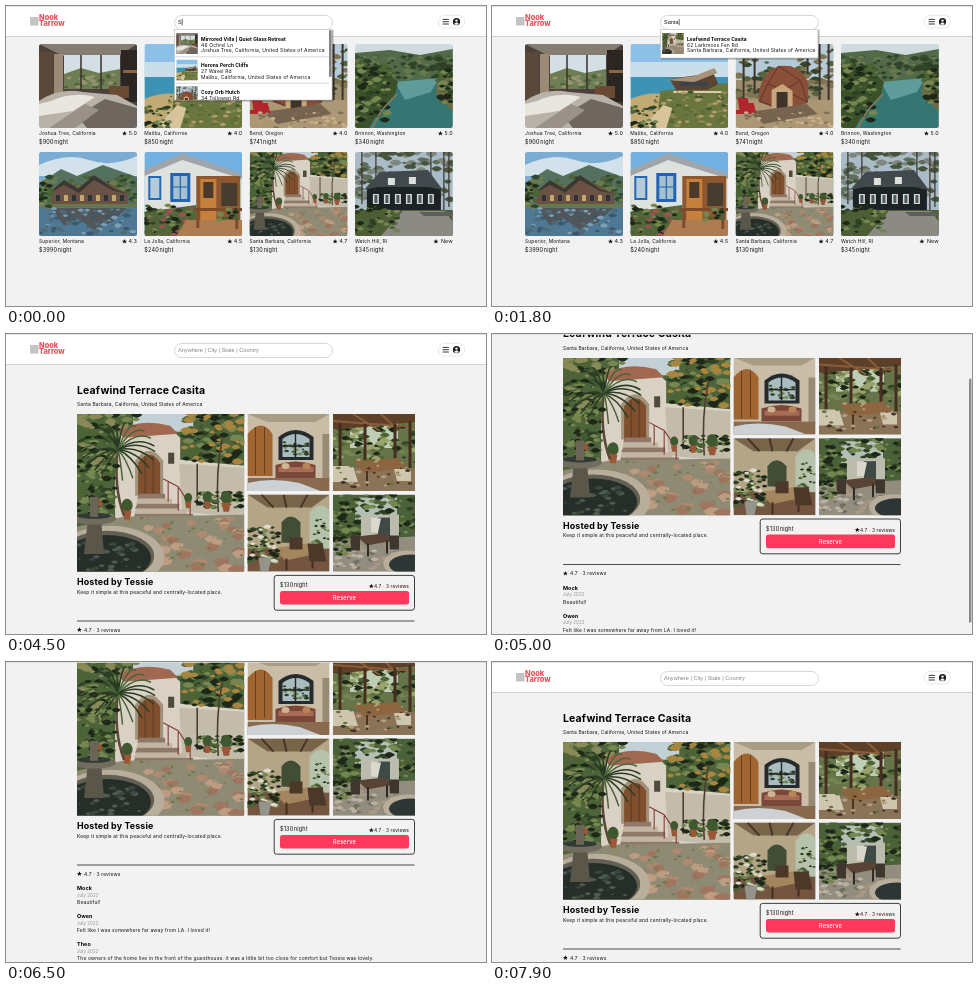
Animation of 480x300 px, one loop 8 s. Source, as an HTML page:

```html
<!DOCTYPE html>
<html lang="en">
<head>
<meta charset="utf-8">
<title>Stay search</title>
<style>
html, body { margin: 0; width: 100%; height: 100%; overflow: hidden; background: #f2f2f2; }
svg#stage { display: block; width: 100vw; height: 100vh; }
text { font-family: Inter, "Open Sans", sans-serif; font-weight: 400; letter-spacing: .03em; fill: #111; white-space: pre; }
.b { font-weight: 700; letter-spacing: .015em; fill: #000; }
.logo { font-weight: 800; letter-spacing: 0; fill: #e2555c; }
.field { font-family: "Liberation Sans", Arial, sans-serif; letter-spacing: 0; }
.hint { fill: #858585; }
.date { fill: #8c8c8c; }
.on { font-weight: 500; fill: #fff; }

#page, #thumb, #bar, .step { animation: 8s infinite; }
.step { animation-timing-function: step-end; }
#list { animation-name: list; }
#loading { animation-name: loading; }
#detail { animation-name: detail; }
#hint { animation-name: hint; }
#all { animation-name: all; }
#match { animation-name: match; }
#cover { animation-name: type; }
#caret { animation-name: blink; }
#page { animation-name: scroll; }
#thumb { animation-name: thumb; }
#bar { animation-name: bar; }

@keyframes list { 0% { visibility: visible } 38.75%, 100% { visibility: hidden } }
@keyframes hint { 0% { visibility: hidden } 38.75%, 100% { visibility: visible } }
@keyframes loading { 0% { visibility: hidden } 38.75% { visibility: visible } 47.5%, 100% { visibility: hidden } }
@keyframes detail { 0% { visibility: hidden } 47.5%, 100% { visibility: visible } }
@keyframes all { 0% { opacity: 1 } 6.25%, 100% { opacity: 0 } }
@keyframes match { 0% { opacity: 0 } 6.25%, 100% { opacity: 1 } }
@keyframes type {
  0% { transform: translateX(3.8px) }
  6.25% { transform: translateX(6.9px) }
  10% { transform: translateX(10px) }
  13.75% { transform: translateX(11.6px) }
  17.5%, 100% { transform: translateX(14.7px) }
}
@keyframes blink { 0%, 30% { opacity: 1 } 23.75%, 36.25%, 100% { opacity: 0 } }
@keyframes scroll {
  0%, 58.75% { transform: none; animation-timing-function: ease-in-out }
  65%, 87% { transform: translateY(-84px); animation-timing-function: ease-in }
  88.75% { transform: translateY(-49.5px); animation-timing-function: linear }
  90% { transform: translateY(-16px); animation-timing-function: ease-out }
  92.5%, 100% { transform: none }
}
@keyframes thumb {
  0%, 58.75% { transform: none; animation-timing-function: ease-in-out }
  65%, 87% { transform: translateY(65.6px); animation-timing-function: ease-in }
  88.75% { transform: translateY(38.7px); animation-timing-function: linear }
  90% { transform: translateY(12.5px); animation-timing-function: ease-out }
  92.5%, 100% { transform: none }
}
@keyframes bar {
  0%, 58.7% { opacity: 0 } 58.8%, 72% { opacity: 1 } 75%, 86.9% { opacity: 0 }
  87%, 95% { opacity: 1 } 97.5%, 100% { opacity: 0 }
}
</style>
</head>
<body>
<svg id="stage" viewBox="0 0 480 300"></svg>
<script>
const rect = (x, y, w, h, fill, more = '') =>
  `<rect x="${x}" y="${y}" width="${w}" height="${h}" fill="${fill}" ${more}/>`;
const path = (d, fill, more = '') => `<path d="${d}" fill="${fill}" ${more}/>`;
const line = (d, stroke, w = 1) => path(d, 'none', `stroke="${stroke}" stroke-width="${w}"`);
const oval = (x, y, rx, ry, fill) => `<ellipse cx="${x}" cy="${y}" rx="${rx}" ry="${ry}" fill="${fill}"/>`;
const text = (x, y, size, str, cls = '', more = '') =>
  `<text x="${x}" y="${y}" font-size="${size}" class="${cls}" ${more}>${str}</text>`;
const star = (x, y) => path(
  'M0-2.7.8-.8 2.7-.75 1.2.5 1.7 2.3 0 1.2-1.7 2.3-1.2.5-2.7-.75-.8-.8Z', '#111', `transform="translate(${x} ${y}) scale(.9)"`);
const photo = (id, x, y, w, h) => `<use href="#${id}" x="${x}" y="${y}" width="${w}" height="${h}"/>`;
const range = n => [...Array(n).keys()];

// Seeded flecks for leaves, stones and ripples; one path per colour
let seed = 7;
const rnd = () => (seed = seed * 16807 % 2147483647) / 2147483647;
const fleck = (x, y, s) => `M${(x - s).toFixed(1)} ${y.toFixed(1)}q${s} ${-s} ${2 * s} 0q${-s} ${s} ${-2 * s} 0`;
const spray = (n, x, y, w, h, r, colours) => colours.map(c =>
  path(range(Math.ceil(n * 2 / colours.length)).map(() =>
    fleck(x + rnd() * w, y + rnd() * h, +(r * (.4 + rnd() * .7)).toFixed(1))).join(''), c)).join('');
const greens = ['#2f4125', '#4c6334', '#758650', '#1d2819'];

const frond = a => {
  const x = Math.cos(a), y = Math.sin(a);
  return line(`M41 36Q${41 + 20 * x} ${26 + 20 * y} ${41 + 37 * x} ${38 + 29 * y}`, a % 2 > 1 ? '#4a6339' : '#2a3d24', 1.5);
};
const pot = (x, y, s) => oval(x, y - 5 * s, 5 * s, 6 * s, '#3f5830') +
  path(`M${x - 4 * s} ${y}h${8 * s}l${-1.5 * s} ${8 * s}h${-5 * s}Z`, '#9a5637');

const photos = {
  bedroom: [98, 84,
    rect(0, 0, 98, 84, '#4b423b') + path('M0 0H98L80 12H24Z', '#857c72') + rect(25, 11, 56, 34, '#d3dfe4') +
    path('M25 30 42 24 60 29 81 25V45H25Z', '#6f7d54') + spray(12, 27, 30, 52, 14, 4, ['#4d613d', '#93946b']) +
    line('M42 11V46M62 11V46', '#38302a', 1.5) + rect(0, 8, 14, 50, '#5a493b') + rect(15, 10, 9, 42, '#9b8a76') +
    rect(82, 6, 16, 52, '#2c2622') + rect(84, 26, 14, 3, '#8a6443') + rect(70, 42, 20, 12, '#6a4a33') +
    path('M0 57Q20 43 44 48L78 51 98 62V84H0Z', '#b9b2a9') + path('M12 57Q34 47 56 53L34 67 0 72V60Z', '#e9e6e0') +
    path('M38 72 66 55 98 64V84H48Z', '#6f675f') + path('M10 84 46 60 60 66 36 84Z', '#9a9188')],
  beach: [98, 84,
    rect(0, 0, 98, 36, '#8cc0e6') + rect(0, 18, 98, 16, '#c8dfea') + rect(0, 33, 98, 22, '#3e92b4') +
    path('M0 55Q24 46 36 52L44 84H0Z', '#c2aa75') + path('M30 47 98 39V84H26Z', '#6a7640') +
    path('M39 35 83 29 88 40 77 46H46Z', '#5c4433') + path('M35 36 64 32 84 24 87 29 64 38Z', '#a8927a') +
    rect(50, 38, 28, 4, '#37444a') + line('M43 48H91', '#dccbaa', 2) + spray(46, 24, 48, 74, 34, 3.5, ['#42582c', '#8a8752', '#5e6e36', '#b39c67']) +
    path('M12 84 33 61 42 64 36 84Z', '#d7c49d') + spray(16, 0, 62, 26, 22, 4, greens)],
  dome: [98, 84,
    rect(0, 0, 98, 84, '#9c8c70') + rect(0, 0, 98, 36, '#b5cad6') + spray(52, 0, 4, 98, 50, 6, ['#35442d', '#57623e', '#7d7452']) +
    line('M8 0V54M19 0V50M84 0V58M93 0V60M72 0V30', '#3f342b', 2) + rect(0, 56, 98, 28, '#ac9775') +
    path('M23 58Q22 31 43 22 66 20 73 40L72 59 48 67Z', '#8a4f38') +
    line('M43 22 32 40 48 46 65 37 43 22M32 40 24 57 48 66 48 46 72 58 65 37', '#57301f', .8) +
    path('M36 64V46L47 40 57 47V65Z', '#c9a57a') + rect(41, 48, 11, 16, '#3f332a') +
    path('M13 68 71 60 82 70 28 80Z', '#756350') + path('M2 54h10l3 13H4ZM0 66h16v4H0ZM9 59h9l3 11H12Z', '#b0252e') +
    spray(24, 10, 68, 88, 16, 3, ['#7f6f59', '#c7b08a'])],
  river: [98, 84,
    rect(0, 0, 98, 84, '#357672') + rect(0, 0, 98, 14, '#d0dbe0') + path('M0 9 35 6 65 11 98 5V34L60 36 0 44Z', '#52694a') +
    spray(50, 0, 12, 98, 22, 5, ['#3b5333', '#66784c', '#2e4429']) + path('M40 38 84 34 76 48 50 56Z', '#5f9c99') +
    path('M0 20 30 26 43 38 40 52 25 65 14 84H0Z', '#3a5129') + spray(50, 0, 20, 34, 58, 5, greens) +
    path('M98 30 84 36 80 48 98 68Z', '#6d6a45') + spray(22, 84, 20, 14, 40, 5, greens) + line('M42 50 27 66 17 84', '#857a5f', 1.8)],
  lodge: [98, 84,
    rect(0, 0, 98, 84, '#7badd4') + path('M0 13Q28 0 50 8T98 4V24H0Z', '#d3e1ea') + path('M0 32 22 17 38 24 64 13 98 25V52H0Z', '#54705f') +
    spray(42, 0, 24, 98, 26, 5, ['#2f4831', '#4d6339', '#6b7c4b']) + path('M12 40 25 29 40 35 55 24 73 33 89 42V54H12Z', '#695243') +
    path('M10 41 25 28 39 37 55 23 75 37 90 42 75 39 55 28 40 41 25 33Z', '#3b3733') + range(9).map(i => rect(17 + i * 8, 43, 4, 6, i % 2 ? '#c4a773' : '#2a3338')).join('') +
    rect(0, 53, 98, 31, '#4f7894') + path('M13 56H88L73 70 55 78 38 66 25 74Z', '#50565a') + spray(32, 0, 56, 98, 27, 4, ['#3a5868', '#7d9fb3', '#4e6a76']) +
    rect(0, 52, 98, 3, '#6c7748') + spray(14, 0, 30, 12, 27, 4, greens)],
  cottage: [98, 84,
    rect(0, 0, 98, 84, '#72b0e2') + path('M0 20 38 4 98 24V70H0Z', '#dfe1df') + path('M0 18 38 1 98 22V27L38 8 0 24Z', '#9fa5a8') +
    rect(4, 24, 13, 24, '#2468b8') + rect(6, 26, 9, 20, '#b6cbd9') + rect(26, 21, 20, 29, '#2263b4') + rect(29, 24, 14, 23, '#a5c0d0') + line('M36 24V47M29 35H43', '#2263b4', 1.2) +
    rect(52, 24, 44, 46, '#8d5830') + rect(56, 27, 16, 42, '#c5803c') + rect(59, 30, 10, 16, '#4a392c') + rect(77, 31, 16, 23, '#473c30') +
    path('M0 60 52 53V84H0Z', '#55663a') + spray(34, 0, 53, 47, 31, 4, [...greens, '#9e5150']) + path('M42 68H98V84H32Z', '#ad7d52') +
    path('M50 56H98V59H50ZM52 58h3v18h-3ZM91 58h3v19h-3Z', '#7d4a2c') + spray(9, 73, 57, 20, 11, 4, greens)],
  garden: [167, 158,
    rect(0, 0, 167, 158, '#4d6339') + rect(56, 0, 60, 18, '#c3d0d6') + spray(75, 0, 0, 60, 66, 6, [...greens, '#8a8a58']) +
    path('M44 18 91 13 103 24V46L167 52V111H38V60Z', '#d9d2c4') + path('M42 17Q63 4 93 12L101 20 46 24Z', '#a06850') +
    path('M102 50 167 54V104L105 98Z', '#c4bcab') + path('M58 82V47Q72 27 86 47V82Z', '#a3927b') + path('M61 82V49Q72 33 83 49V82Z', '#80502e') +
    line('M68 42V81M76 42V81', '#523420', .8) + rect(91, 39, 6, 11, '#4e483d') +
    range(5).map(i => path(`M${62 - i} ${80 + i * 5}H${88 + i * 7}v5H${60 - i}Z`, i % 2 ? '#c2b5a2' : '#8f7869')).join('') +
    line('M86 65 101 73 113 91V104M91 68V88M101 74V97', '#853a38', 1.1) +
    path('M46 103 167 101V158H0V113Z', '#8e8a74') + range(42).map(i => {
      const y = 105 + i * 1.22, x = 50 + rnd() * 117, s = 5 + i / 9;
      return path(`M${x - s} ${y}l${s * .7}-${s * .45} ${s * 1.2} ${s * .2} ${-s * .3} ${s * .7} ${-s} ${s * .2}Z`, ['#b08a70', '#bd9c82', '#a07560'][i % 3]);
    }).join('') + spray(30, 45, 104, 122, 52, 2.5, ['#6c7a4b', '#878b62']) +
    spray(70, 106, 0, 61, 48, 6, [...greens, '#a8853f']) + line('M141 98Q138 60 145 25M120 92V50', '#4d3d2f', 1.6) + spray(22, 118, 78, 49, 16, 4, greens) +
    pot(111, 88, .8) + pot(130, 88, .9) + pot(149, 89, 1.1) + pot(50, 97, 1.1) + pot(22, 85, 1) +
    line('M47 102Q36 73 41 34', '#5d4935', 2.6) + range(22).map(i => frond(i * .29)).join('') +
    spray(42, 0, 52, 40, 52, 5, greens) + oval(33, 143, 54, 31, '#b9ae9b') + oval(30, 142, 47, 25, '#625f53') + oval(30, 144, 44, 23, '#262e2a') +
    spray(18, 0, 128, 62, 28, 4, ['#4d5a50', '#39473d']) + path('M11 105h13l3 35H7Z', '#5b564a') + oval(17, 105, 22, 6, '#726c5f') + oval(17, 102, 17, 3, '#313b35') + rect(13, 83, 8, 20, '#6b6558')],
  barn: [98, 84,
    rect(0, 0, 98, 84, '#a9bbc6') + spray(60, 0, 0, 98, 48, 6, ['#5f6d5b', '#7d8780', '#46543c']) + line('M7 0V52M21 0V45M76 0V40M89 0V60M94 0V55', '#413b34', 1.3) +
    path('M12 37 25 22 72 20 86 38V61H12Z', '#1d2224') + path('M9 38 25 20 73 18 88 38 74 35H23Z', '#41494d') +
    range(6).map(i => rect(18 + i * 11, 42, 6, 10, '#d5d9d4') + rect(19.5 + i * 11, 43, 3, 8, '#4b5a61')).join('') + rect(33, 26, 7, 7, '#dce0da') + rect(54, 25, 7, 7, '#dce0da') +
    path('M0 58H98V84H0Z', '#4d5d35') + path('M48 59H90L98 70V84H26Z', '#8b8a85') + spray(24, 0, 54, 42, 26, 4, greens) + path('M64 60H98V64H69Z', '#5c5f55')],
  window: [82, 77,
    rect(0, 0, 82, 77, '#c9bda7') + path('M0 0H82L68 8H20Z', '#a99b84') + path('M0 60V20Q14 3 25 20V62H0Z', '#a06530') + line('M8 13V61M17 13V60', '#6a3d1b', 1) +
    path('M31 46V23Q48 9 66 23V46Z', '#252b2d') + path('M35 43V25Q48 15 62 25V43Z', '#a9bcc0') + spray(12, 37, 28, 23, 13, 3, greens) + line('M48 18V43M35 32H62', '#22282a', 1.4) +
    path('M28 51Q48 44 68 51V64H28Z', '#7a4738') + rect(31, 53, 35, 5, '#a76c55') + oval(38, 52, 4, 3, '#d0b592') + oval(59, 52, 4, 3, '#b98558') +
    rect(75, 20, 7, 47, '#998a74') + rect(0, 64, 82, 13, '#8a6a4e') + path('M0 69Q24 63 52 69L73 77H0Z', '#cdd1d4')],
  patio: [82, 77,
    rect(0, 0, 82, 77, '#67744a') + rect(17, 4, 48, 30, '#c0cdb5') + spray(52, 0, 10, 82, 35, 5, [...greens, '#9aa36b']) +
    path('M0 0H82V8L10 15H0Z', '#5e3f28') + line('M0 7 82 13M20 0 47 17M48 0 65 16', '#8a5d38', 2) + line('M7 9V73M32 10V49M62 10V51M77 7V67', '#452e1f', 3) +
    rect(0, 54, 82, 23, '#8b7358') + path('M20 47 64 44 75 54 32 59Z', '#8d653f') + line('M34 57V72M68 54V67', '#4d331f', 2) +
    path('M0 52h20l5 16H0ZM61 55h17v12H64Z', '#cfc6b0') + spray(20, 0, 45, 82, 28, 3, ['#43352a', '#66713f', '#b39e7d'])],
  lounge: [82, 77,
    rect(0, 0, 82, 77, '#b5a587') + path('M0 0H82L64 13H20Z', '#786449') + line('M14 0 26 13M36 0 39 13M60 0 53 13', '#443524', 2) +
    path('M34 48V28Q43 16 53 28V49Z', '#424d36') + path('M62 54V18Q73 5 82 16V56Z', '#b5c3ac') + spray(10, 65, 24, 16, 26, 3, greens) +
    rect(0, 54, 82, 23, '#735540') + path('M25 54 59 49 71 59 38 66Z', '#a3855e') + line('M39 64V76M65 59V74', '#452d1d', 2) +
    path('M42 43h13v12H42ZM60 49h15l4 18H62Z', '#4c3829') + spray(42, 0, 30, 32, 38, 4, [...greens, '#dcd8ca']) + path('M11 63h13l-3 14h-8Z', '#94958a')],
  terrace: [82, 77,
    rect(0, 0, 82, 77, '#4b613a') + rect(22, 3, 42, 22, '#b2bfb4') + spray(62, 0, 0, 82, 43, 5, greens) + rect(28, 20, 38, 22, '#bcbcae') + rect(45, 23, 12, 19, '#3e4a45') +
    path('M0 46 82 42V77H0Z', '#938d80') + spray(24, 0, 50, 67, 25, 4, ['#aa9887', '#6f7064', '#b9b2a1']) + path('M24 42 51 39 61 46 34 51Z', '#594334') +
    line('M35 49V62M54 46V59', '#322b24', 2) + path('M17 41h10v15H18ZM56 41h10v14H57Z', '#3f372e') + path('M38 38V23l10 1-3 14Z', '#dad8cd') +
    spray(18, 0, 35, 17, 25, 4, greens) + oval(75, 69, 25, 13, '#b8ad9b') + oval(78, 70, 22, 10, '#2d3634')]
};
const symbols = Object.entries(photos).map(([id, [w, h, art]]) =>
  `<symbol id="${id}" viewBox="0 0 ${w} ${h}" preserveAspectRatio="xMidYMid slice">${art}</symbol>`).join('');

const stays = [
  ['bedroom', 'Joshua Tree, California', 900, '5.0'],
  ['beach', 'Malibu, California', 850, '4.0'],
  ['dome', 'Bend, Oregon', 741, '4.0'],
  ['river', 'Brinnon, Washington', 340, '5.0'],
  ['lodge', 'Superior, Montana', 3990, '4.3'],
  ['cottage', 'La Jolla, California', 240, '4.5'],
  ['garden', 'Santa Barbara, California', 130, '4.7'],
  ['barn', 'Watch Hill, RI', 345, 'New']
];
const spot = i => [33 + i % 4 * 105.3, i < 4 ? 38 : 146];
const corners = stays.map((s, i) => rect(...spot(i), 98, 84, '#000', 'rx="2.5"')).join('');
const pictures = stays.map(([id], i) => photo(id, ...spot(i), 98, 84)).join('');
const labels = stays.map(([, place, price, rate], i) => {
  const [x, y] = spot(i);
  return text(x, y + 90.6, 4.9, place) + star(x + (rate === 'New' ? 81 : 85.5), y + 89.5) +
    text(x + 98, y + 91.4, 5.4, rate, '', 'text-anchor="end"') +
    text(x, y + 99.8, 5.5, `$${price}<tspan dx=".8">night</tspan>`);
}).join('');

const title = 'Leafwind Terrace Casita';
const country = ', California, United States of America';
const hit = (y, id, name, street, city) => photo(id, 170.5, y, 21, 21) + text(195, y + 7.7, 4.9, name, 'b') +
  text(195, y + 13.6, 5, street) + text(195, y + 19.4, 5, city + country);
const panel = h => rect(168.5, 23.5, 157.5, h, '#fff', 'stroke="#bbb" stroke-width=".6" filter="url(#shade)"');

const list = `<g id="list" class="step">
  <g clip-path="url(#cards)">${pictures}</g>${labels}
  ${text(172, 18, 5.6, 'Santa', 'field')}
  <g id="cover" class="step">${rect(172, 12, 20, 9, '#fff')}<g id="caret" class="step">${rect(172, 12.8, .6, 6.6, '#111')}</g></g>
  <g id="all" class="step">${panel(70.5)}<g clip-path="url(#drop)">
    ${hit(27, 'bedroom', 'Mirrored Villa | Quiet Glass Retreat', '46 Ochrel Ln', 'Joshua Tree')}
    ${hit(53.5, 'beach', 'Herons Perch Cliffs', '27 Wavel Rd', 'Malibu')}
    ${hit(80, 'dome', 'Cozy Orb Hutch', '34 Tollowen Rd', 'Bend')}
    ${line('M169 50.8H323M169 77.3H323', '#c9c9c9', .7)}</g>${rect(323, 24, 2.6, 47, '#858585', 'rx="1.2"')}</g>
  <g id="match" class="step">${panel(28.5)}${hit(27, 'garden', title, '62 Larkmoss Fen Rd', 'Santa Barbara')}</g>
</g>`;

const header = rect(0, 0, 480, 30, '#fff') + rect(0, 30, 480, 1, '#d2d2d2') + rect(24, 11, 8.5, 8.5, '#c4c4c4') +
  text(33, 13.7, 7.4, 'Nook', 'logo') + text(33, 19.6, 7.4, 'Tarrow', 'logo') +
  rect(168.5, 9.5, 158, 14, '#fff', 'rx="7" stroke="#ccc" stroke-width=".8"') +
  `<g id="hint" class="step">${text(172, 18.2, 5.6, 'Anywhere | City | State | Country', 'field hint')}</g>` +
  rect(432.3, 9.3, 26.5, 12.8, '#fff', 'rx="6.4" stroke="#ddd" stroke-width=".7"') +
  line('M436.6 13.4H442.8M436.6 15.7H442.8M436.6 18H442.8', '#222', .9) +
  oval(450.5, 15.7, 3.6, 3.6, '#1b1b1b') + oval(450.5, 14.6, 1.2, 1.2, '#fff') + path('M448.3 17.9Q450.5 15.3 452.7 17.9 450.5 19.7 448.3 17.9Z', '#fff');

const review = (y, name, words) => text(71, y, 5.4, name, 'b') + text(71, y + 6.6, 4.3, 'July 2022', 'date') + text(71, y + 14, 4.95, words);
const score = '4.7 · 3 reviews';
const detail = `<g id="detail" class="step">
  ${text(71, 59.6, 10.5, title, 'b')}${text(71, 72.2, 4.9, 'Santa Barbara' + country)}
  ${photo('garden', 71, 80, 167.3, 157.6)}
  ${photo('window', 241.5, 80, 82, 77)}${photo('patio', 327, 80, 82, 77)}
  ${photo('lounge', 241.5, 160.6, 82, 77)}${photo('terrace', 327, 160.6, 82, 77)}
  ${text(71, 251, 8.9, 'Hosted by Tessie', 'b')}
  ${text(71, 259.7, 4.95, 'Keep it simple at this peaceful and centrally-located place.')}
  ${rect(268.2, 241.4, 140.3, 34.8, 'none', 'rx="2.5" stroke="#111" stroke-width=".8"')}
  ${text(274, 253, 5.5, '$130<tspan dx=".6">night</tspan>')}${star(365.3, 252.2)}${text(403, 254, 4.8, score, '', 'text-anchor="end"')}
  ${rect(274, 257, 129, 13.6, '#ff385c', 'rx="2.5"')}${text(338.5, 265.9, 5.6, 'Reserve', 'on', 'text-anchor="middle"')}
  ${rect(71, 286.6, 337.5, .8, '#222')}${star(73.4, 295.8)}${text(78, 297.6, 5, score)}
  ${review(312, 'Mock', 'Beautiful!')}
  ${review(340, 'Owen', 'Felt like I was somewhere far away from LA. I loved it!')}
  ${review(368, 'Theo', 'The owners of the home live in the front of the guesthouse. it was a little bit too close for comfort but Tessie was lovely.')}
</g>`;

document.getElementById('stage').innerHTML = `
  <defs>${symbols}<clipPath id="cards">${corners}</clipPath><clipPath id="drop">${rect(168, 24, 155, 70, '#000')}</clipPath>
  <filter id="shade" x="-5%" y="-15%" width="112%" height="135%"><feDropShadow dx=".8" dy=".9" stdDeviation=".7" flood-opacity=".55"/></filter></defs>
  ${rect(0, 0, 480, 300, '#f2f2f2')}
  <g id="page">${header}${list}<g id="loading" class="step">${text(0, 36.2, 5.5, 'Loading...')}</g>${detail}</g>
  ${rect(0, 0, 480, .8, '#dcdcdc')}
  <g id="bar"><g id="thumb">${rect(477, .6, 2.4, 244, '#8b8b8b', 'rx="1.2"')}</g></g>`;
</script>
</body>
</html>
```
